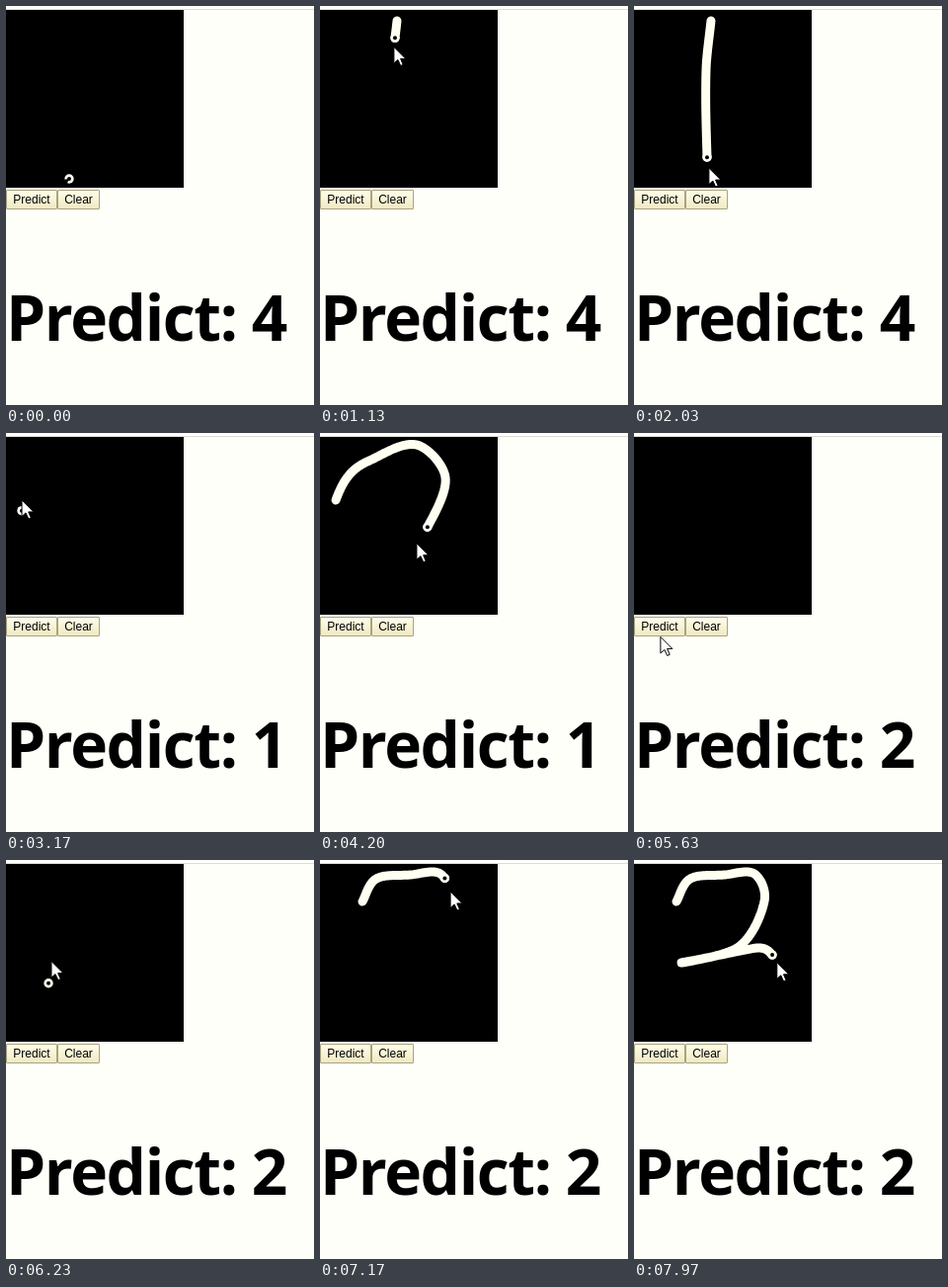
Recreate the animation shown at these times as an HTML page with a canvas. Size 312 by 404 pixels, loop 8 s.

```html
<!DOCTYPE html>
<html lang="en">
<meta charset="utf-8">
<title>Digit pad</title>
<style>
  html, body { margin: 0; width: 100%; height: 100%; overflow: hidden; background: #fffff9; }
  body > * { position: absolute; box-sizing: border-box; margin: 0; }
  #rule { top: 3px; width: 312px; height: 1px; background: #deded8; }
  #pad { top: 4px; width: 180px; height: 180px; background: #000; }
  button {
    top: 186px; height: 20px; padding: 0; border: 1px solid #a8a382; border-radius: 1px;
    background: linear-gradient(#fffde9, #efe9c2); color: #000;
    font: 12px/18px "Liberation Sans", Arial, sans-serif;
  }
  h1 {
    left: 0; top: 283px; white-space: nowrap; color: #000;
    font: bold 64px/64px "Open Sans", "Noto Sans", sans-serif; letter-spacing: -1.4px;
  }
  canvas { left: 0; top: 0; pointer-events: none; }
</style>
<div id="rule"></div>
<div id="pad"></div>
<button style="left:0;width:52px">Predict</button>
<button style="left:52px;width:43px">Clear</button>
<h1>Predict: <span id="digit">4</span></h1>
<canvas width="312" height="404"></canvas>
<script>
const LOOP = 8000, LAG = 60, INK = '#fffff2';
const ctx = document.querySelector('canvas').getContext('2d');
const digit = document.getElementById('digit');

// Brush path: time, x, y. The arrow runs LAG ms ahead of the brush.
const path = [
  [190, 64, 175], [500, 165, 140], [900, 78, 15],
  [1000, 78, 15], [1350, 73, 65], [2030, 74, 153],
  [2090, 76, 164], [2480, 25, 201], [2820, 25, 201], [3170, 16, 79],
  [3230, 16, 68], [3480, 30, 42], [3650, 50, 28], [3880, 98, 12], [4040, 127, 45],
  [4200, 109, 95], [4320, 84, 124], [4500, 30, 141], [4750, 48, 147], [5000, 100, 149],
  [5060, 117, 151], [5300, 30, 199], [5800, 30, 200], [6230, 43, 125], [6290, 46, 103], [6420, 43, 42],
  [6520, 43, 42], [6750, 57, 19], [7000, 92, 15], [7140, 122, 14], [7270, 132, 42],
  [7430, 106, 88], [7580, 48, 104], [7770, 108, 92], [7840, 128, 89], [7970, 140, 96], [8060, 147, 108]
];
// Strokes: pen down, pen up, wiped
const strokes = [[1000, 2030, 2630], [3230, 5000, 5370], [6520, 7970, LOOP]];

function slope(i, k) {
  const a = path[Math.max(i - 1, 0)], b = path[Math.min(i + 1, path.length - 1)];
  return (b[k] - a[k]) / (b[0] - a[0]);
}

function pos(t) {
  const last = path.length - 1;
  t = Math.min(Math.max(t, path[0][0]), path[last][0]);
  let i = 0;
  while (i < last - 1 && path[i + 1][0] < t) i++;
  const a = path[i], b = path[i + 1], d = b[0] - a[0], u = (t - a[0]) / d, v = 1 - u;
  return [1, 2].map(k =>
    v * v * ((1 + 2 * u) * a[k] + u * d * slope(i, k)) +
    u * u * ((3 - 2 * u) * b[k] - v * d * slope(i + 1, k)));
}

function drawStroke(from, to) {
  ctx.beginPath();
  for (let t = from; t < to; t += 8) ctx.lineTo(...pos(t));
  ctx.lineTo(...pos(to));
  ctx.lineWidth = 9;
  ctx.strokeStyle = INK;
  ctx.stroke();
}

function drawBrush(t) {
  const [x, y] = pos(t);
  const disc = (r, color) => {
    ctx.beginPath();
    ctx.arc(x, y, r, 0, 7);
    ctx.fillStyle = color;
    ctx.fill();
  };
  disc(4.7, INK);
  disc(2, '#000');
  if (t < 130) {
    ctx.beginPath();
    ctx.moveTo(x, y);
    ctx.arc(x, y, 6, 2, 3);
    ctx.fill();
  }
}

function drawArrow(x, y) {
  ctx.save();
  ctx.translate(x, y);
  ctx.beginPath();
  ctx.moveTo(0, 0);
  ctx.lineTo(0, 16.5);
  ctx.lineTo(4, 13);
  ctx.lineTo(6.8, 19);
  ctx.lineTo(9.3, 18);
  ctx.lineTo(6.7, 12);
  ctx.lineTo(12, 12);
  ctx.closePath();
  ctx.fillStyle = '#fff';
  ctx.strokeStyle = '#000';
  ctx.lineWidth = 1;
  ctx.fill();
  ctx.stroke();
  ctx.restore();
}

function frame(now) {
  const t = now % LOOP;
  digit.textContent = t < 2630 ? 4 : t < 5370 ? 1 : 2;
  ctx.clearRect(0, 0, 312, 404);
  ctx.save();
  ctx.beginPath();
  ctx.rect(0, 4, 180, 180);
  ctx.clip();
  ctx.lineCap = ctx.lineJoin = 'round';
  for (const [down, up, wiped] of strokes)
    if (t >= down && t < wiped) drawStroke(down, Math.min(t, up));
  if (pos(t)[1] < 184) drawBrush(t);
  ctx.restore();
  if (t >= 130) drawArrow(...pos(t + LAG));
  requestAnimationFrame(frame);
}
requestAnimationFrame(frame);
</script>
</html>
```
